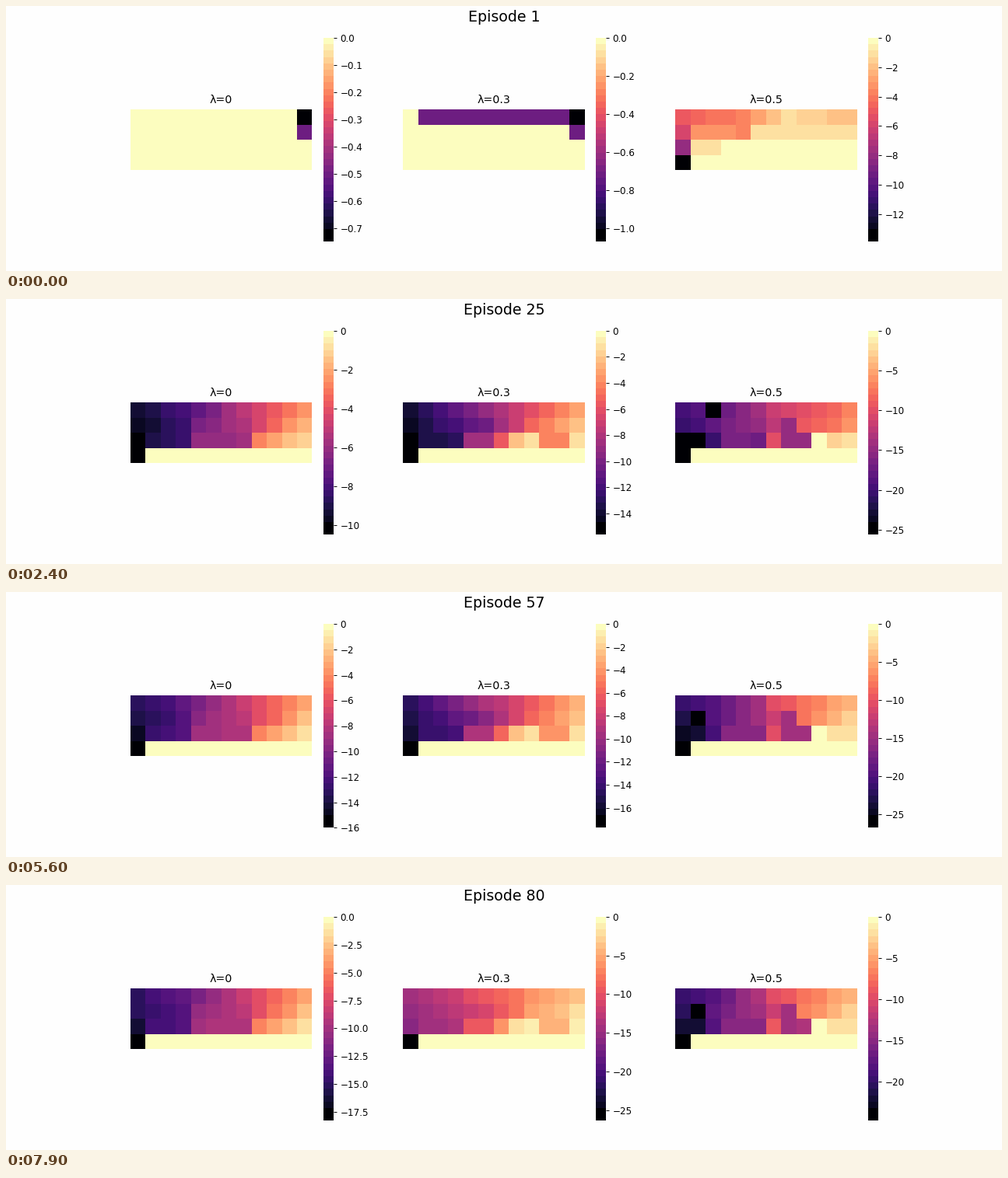
These frames come from a looping animation (1280 by 341 pixels, 8000 ms). A matplotlib script:

```python
import numpy as np
import matplotlib
import matplotlib.pyplot as plt
from matplotlib.animation import FuncAnimation
from matplotlib.colors import ListedColormap
from matplotlib.ticker import MaxNLocator

W, H, DPI = 1280, 341, 64
PT = 4 / 3  # scale of all point sizes
EPISODES = 80
WARM_UP = 17  # learning is fastest up to this episode
LEVELS = 32
ROWS, COLS = 4, 12

plt.rcParams.update({
    "font.family": "DejaVu Sans",
    "font.size": 10 * PT,
    "axes.titlesize": 12 * PT,
    "axes.titlepad": 6.6 * PT,
    "ytick.major.size": 3.5 * PT,
    "ytick.major.pad": 3.5 * PT,
    "ytick.major.width": 0.8 * PT,
})

shades = matplotlib.colormaps["magma"](np.linspace(0, 1, LEVELS))
shades[1] = shades[0]
CMAP = ListedColormap(shades)


def profile(*rows):
    """Shades (0 worst, 1 best); each row runs through (column, percent) points."""
    grid = np.ones((ROWS, COLS))
    for r, points in enumerate(rows):
        grid[r] = np.interp(np.arange(COLS), *zip(*points)) / 100
    grid[3, 0] = 0
    return grid


# Grids after the first episode
first_0 = np.ones((ROWS, COLS))
first_0[:2, -1] = 0, 0.33
first_3 = first_0.copy()
first_3[0, 1:-1] = 0.33
first_5 = profile(
    [(0, 66), (4, 73), (5, 80), (7, 92), (11, 87)],
    [(0, 57), (1, 78), (3, 78), (4, 74), (5, 92)],
    [(0, 43), (1, 92), (2, 92), (3, 100)])

# Grids once the path has been learned
learned_0 = profile(
    [(0, 15), (3, 27), (11, 80)],
    [(0, 12), (3, 24), (4, 39), (7, 51), (11, 86)],
    [(0, 6), (1, 19), (3, 24), (4, 45), (7, 47), (8, 75), (11, 92)])
learned_3 = profile(
    [(0, 16), (11, 83)],
    [(0, 13), (5, 37), (8, 69), (11, 88)],
    [(0, 9), (1, 17), (3, 21), (4, 47), (5, 47), (7, 88), (8, 95),
     (9, 76), (10, 76), (11, 95)])
learned_5 = profile(
    [(0, 18), (2, 24), (5, 46), (6, 60), (11, 85)],
    [(0, 12), (2, 26), (5, 45), (6, 55), (7, 44), (8, 72), (11, 90)],
    [(0, 6), (1, 8), (3, 38), (5, 37), (6, 62), (7, 44), (8, 46),
     (9, 100), (10, 92), (11, 95)])

# Lowest value of each scale
KEYS = (1, 17, 33, 46, 57, 64, 72, 80)
DEPTH_0 = (0.75, 9.19, 11.78, 13.76, 16, 16.7, 17.43, 18.3)
DEPTH_3 = (1.072, 13.13, 18.16, 18.02, 17.75, 17.9, 18.02, 26.4)
DEPTH_5 = (13.88, 24.83, 26.46, 26.79, 26.79, 26.79, 25, 24.72)


def mix(a, b, t):
    return a + (b - a) * t


class Panel:
    def __init__(self, name, first, learned, depths, settled=np.inf,
                 contrast=1, dips=()):
        self.name, self.first, self.learned = name, first, learned
        self.depths, self.settled = depths, settled
        self.contrast, self.dips = contrast, dips

    def depth(self, time):
        return np.interp(time, KEYS, self.depths)

    def grid(self, episode, time):
        # Costs shrink slowly, and also when only the start gets worse
        cost = np.interp(episode, (17, 46, 80), (1.08, 1, 0.97))
        cost *= min(1, self.settled / self.depth(time))
        g = 1 - (1 - self.learned) * cost
        contrast = np.interp(episode, (17, 33), (self.contrast, 1))
        g[:2] = mix(0.47, g[:2], contrast)
        g[3, 0] = 0
        for cell, begin, end in self.dips:
            if begin <= episode <= end:
                g[cell] = 0.02
        g = mix(self.first, g, min(1, (time - 1) / (WARM_UP - 1)))
        g = np.clip(g, 0, 1)
        return 1 - (1 - g) / (1 - g.min())


PANELS = [
    Panel("0", first_0, learned_0, DEPTH_0),
    Panel("0.3", first_3, learned_3, DEPTH_3, settled=18.2),
    Panel("0.5", first_5, learned_5, DEPTH_5, contrast=0.4,
          dips=[((0, 2), 10, 25), ((1, 1), 40, EPISODES)]),
]


def warp(episode):
    if episode >= WARM_UP:
        return episode
    span = WARM_UP - 1
    return 1 + span * ((episode - 1) / span) ** 0.6


fig = plt.figure(figsize=(W / DPI, H / DPI), dpi=DPI, facecolor="#fefefe")
heading = fig.suptitle("", fontsize=16 * PT, y=0.984)

SLOT = 0.775 / 3.4
BOTTOM, HEIGHT = 0.11, 0.77


def add_axes(i, name):
    left = 0.125 + 1.2 * SLOT * i
    width = 0.8 * SLOT
    tall = width * W / 3 / H
    ax = fig.add_axes([left, BOTTOM + (HEIGHT - tall) / 2, width, tall])
    mesh = ax.pcolormesh(np.zeros((ROWS, COLS)), cmap=CMAP,
                         vmin=0, vmax=LEVELS - 1)
    ax.set(xlim=(0, COLS), ylim=(ROWS, 0))
    ax.set_axis_off()
    ax.set_title(f"λ={name}")

    bar = fig.add_axes([left + 0.85 * SLOT, BOTTOM,
                        HEIGHT * H / 20 / W, HEIGHT])
    bar.pcolormesh([0, 1], np.linspace(0, 1, LEVELS + 1),
                   np.arange(LEVELS)[:, None], cmap=CMAP,
                   transform=bar.transAxes)
    bar.set_xlim(0, 1)
    bar.set_xticks([])
    bar.yaxis.tick_right()
    bar.yaxis.set_major_locator(MaxNLocator(9, steps=[1, 2, 2.5, 5, 10]))
    bar.spines[:].set_visible(False)
    return mesh, bar


axes = [add_axes(i, panel.name) for i, panel in enumerate(PANELS)]


def draw(i):
    episode = i + 1
    time = warp(episode)
    heading.set_text(f"Episode {episode}")
    for panel, (mesh, bar) in zip(PANELS, axes):
        mesh.set_array(np.round(panel.grid(episode, time) * (LEVELS - 1)))
        bar.set_ylim(-panel.depth(time), 0)
    return []


anim = FuncAnimation(fig, draw, frames=EPISODES, interval=100,
                     repeat=True, repeat_delay=0, blit=False)
plt.show()
```
